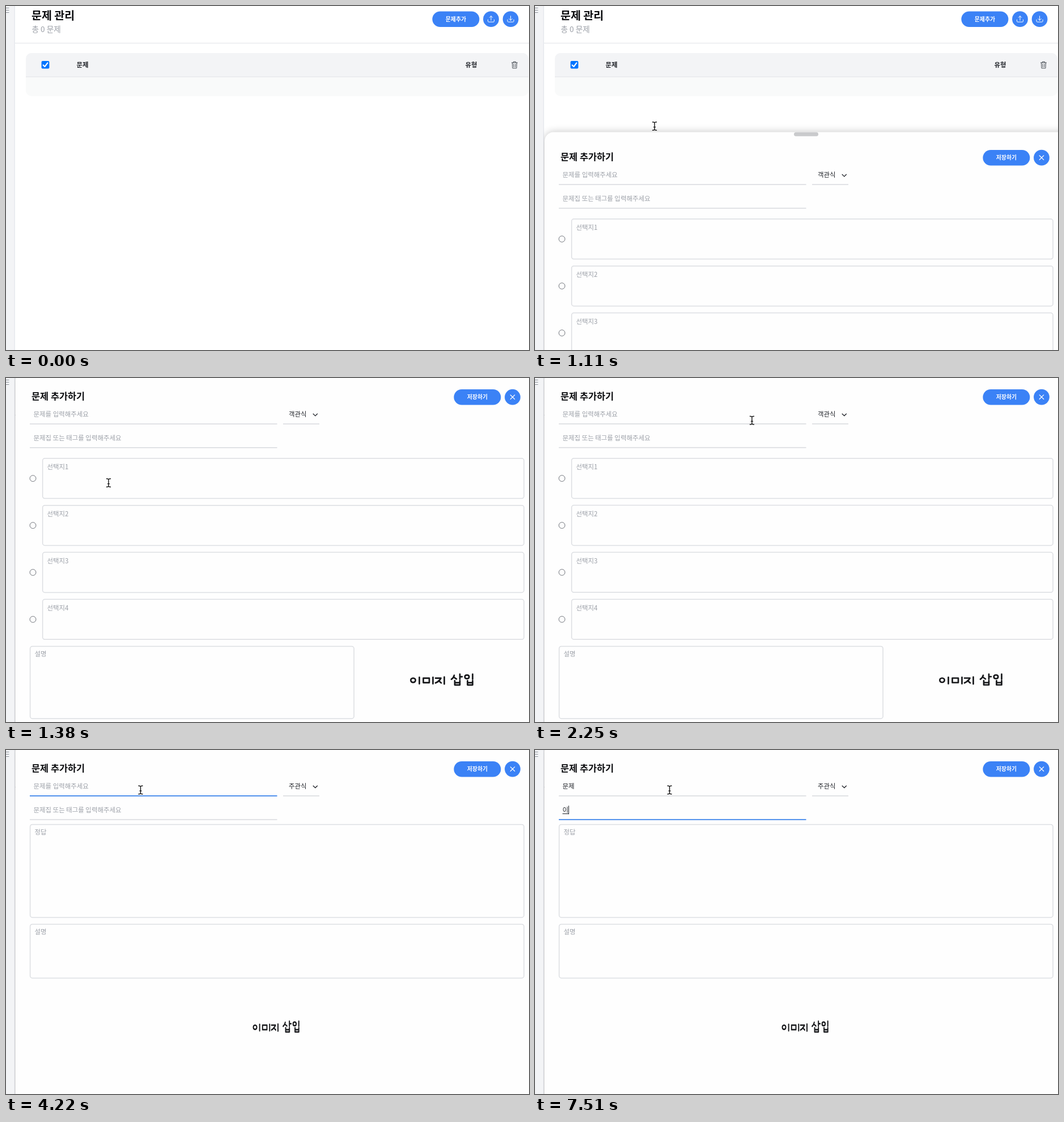
An HTML page with a canvas for the animation above (8000 ms loop, 923x607 px).

```html
<!DOCTYPE html>
<html lang="ko">
<head>
<meta charset="utf-8">
<title>문제 관리</title>
<style>
html, body { margin: 0; width: 100%; height: 100%; overflow: hidden; background: #fff; }
canvas { display: block; }
</style>
</head>
<body>
<canvas id="stage" width="923" height="607"></canvas>
<script>
const W = 923, H = 607, LOOP = 8000;
const c = document.getElementById('stage').getContext('2d');
const FONT = '"Noto Sans CJK KR", "Noto Sans CJK", "Noto Sans CJK JP", sans-serif';
const BLUE = '#3b82f6', FOCUS = '#347fea', LINE = '#dcdee2', INK = '#1f2228', HINT = '#9ca0a8';
const SIZE = 11.45;

// [time, x, y] of the pointer's hot spot
const PATH = [
  [20, 915, 595], [250, 890, 400], [450, 850, 180], [650, 805, 40], [720, 797, 17], [820, 795, 22],
  [890, 795, 22], [1000, 480, 130], [1110, 211, 212], [1250, 187, 200], [1380, 181, 185],
  [1680, 172, 112], [1720, 172, 110], [2100, 300, 80], [2500, 521, 66], [2700, 520, 72],
  [3020, 518, 103], [3150, 516, 110], [3230, 516, 110], [3360, 470, 84], [3600, 280, 74], [3820, 237.5, 70.5]
];

// [time, text, start of the syllable being composed]
const FIRST = [[4880, 'ㅁ', 0], [4960, '무', 0], [5040, '문', 0], [5260, '문ㅈ', 1], [5330, '문제', 1], [5620, '문제', 2]];
const SECOND = [[6340, 'ㅇ', 0], [6480, '이', 0]];

const within = (t, a, b) => t >= a && t < b;

function text(s, x, y, size = SIZE, color = INK, weight = 400, align = 'left') {
  c.font = `${weight} ${size}px ${FONT}`;
  c.fillStyle = color;
  c.textAlign = align;
  c.fillText(s, x, y + size * 0.38);
}

function rect(x, y, w, h, color) {
  c.fillStyle = color;
  c.fillRect(x, y, w, h);
}

function round(x, y, w, h, r, fill, stroke, lw = 1.5) {
  c.beginPath();
  c.roundRect(x, y, w, h, r);
  if (fill) { c.fillStyle = fill; c.fill(); }
  if (stroke) { c.strokeStyle = stroke; c.lineWidth = lw; c.stroke(); }
}

function draw(d, color, lw, x = 0, y = 0, sx = 1, sy = 1, fill) {
  c.save();
  c.translate(x, y);
  c.scale(sx, sy);
  c.lineCap = c.lineJoin = 'round';
  c.strokeStyle = color;
  c.lineWidth = lw;
  const p = new Path2D(d);
  if (fill) { c.fillStyle = fill; c.fill(p); }
  c.stroke(p);
  c.restore();
}

function pill(x, y, label) {
  round(x, y, 83, 27.6, 13.8, BLUE);
  text(label, x + 41.5, y + 13.7, 9.9, '#fff', 600, 'center');
}

function disc(x, y, icon, lw = 1) {
  round(x - 13.9, y - 13.9, 27.8, 27.8, 13.9, BLUE);
  draw(icon, '#fff', lw, x, y);
}

function page() {
  rect(0, 0, W, H, '#fff');
  rect(0, 0, 14.5, H, '#f3f4f6');
  rect(14.5, 0, 1.2, H, '#dfe2e7');
  draw('M-1 3.5H5M-1 7.5H5M-1 11.5H5', '#8b9098', 1.1);
  text('문제 관리', 45, 16.5, 19.5, '#0b0c0f', 600);
  text('총 0 문제', 45.5, 40.5, 13.6, HINT);
  pill(752.4, 9.4, '문제추가');
  const tray = 'M-5.5 1V3.5Q-5.5 5 -4 5H4Q5.5 5 5.5 3.5V1';
  disc(856, 23.2, tray + 'M0 2V-5.5M-2.7 -2.8L0 -5.5L2.7 -2.8');
  disc(890.6, 23.2, tray + 'M0 -5.5V2M-2.7 -0.7L0 2L2.7 -0.7');
  rect(16, 65, W, 1, '#e2e4e8');

  round(35, 83, 887, 76, 10, '#f9fafa');
  round(35, 83, 887, 42, [10, 10, 0, 0], '#f3f4f6');
  rect(35, 124.5, 887, 1, '#e1e4e8');
  round(62.6, 97, 13.8, 13.6, 2, '#0075ff');
  draw('M65.6 104.2L68.4 107L73.4 100.4', '#fff', 2.1);
  text('문제', 124.5, 104, SIZE, INK, 600);
  text('유형', 810.5, 104, SIZE, INK, 600);
  draw('M-5 -4H5M-2 -4V-5.7H2V-4M-4 -4L-3.5 5.8H3.5L4 -4M-1.6 -1.6L-1.4 3.6M1.6 -1.6L1.4 3.6', '#4b5058', 1, 897.5, 104);
}

function box(x, y, w, h, hint) {
  round(x + 0.6, y + 0.4, w - 1, h - 1, 4, null, LINE);
  text(hint, x + 8.5, y + (x > 50 ? 15.5 : 13.5), SIZE, HINT);
}

// hand-lettered picture caption
function lettering(x, y, sx, sy) {
  const b = 'v7.5h9v-7.5m-9 3.5h9';
  draw('M5.5 9.5C0 9.5 0 17 5.5 17C11 17 11 9.5 5.5 9.5M16.5 8V19.5' +
    'M23.5 9.5V17.5H34V9.5ZM40.5 8V19.5M45 9.5H54.5Q52 15 45 18M50.5 14L55 18M60.5 7.5V20' +
    'M78 4.5Q77 9 73 11.5M77.5 8L82 11M88 2.5V11.5M88 7H92M79 14' + b +
    'M100.5 4C95.5 4 95.5 10.5 100.5 10.5C105.5 10.5 105.5 4 100.5 4M110.5 2.5V11.5M101.5 14' + b, '#17181b', 2.7, x, y, sx, sy);
}

function field(y, typed, hint, t, caretOn) {
  let cur = null;
  for (const k of typed) if (t >= k[0]) cur = k;
  if (!cur) text(hint, 48.5, y, SIZE, HINT);
  let end = 48.5;
  if (cur) {
    text(cur[1], 48.5, y, SIZE, INK);
    end += c.measureText(cur[1]).width;
    if (cur[2] < cur[1].length) {
      const start = 48.5 + c.measureText(cur[1].slice(0, cur[2])).width;
      rect(start, y + 6.7, end - start, 1, INK);
    }
  }
  if (caretOn) rect(Math.round(end), y - 7, 1, 15, cur ? INK : '#5c7396');
}

function panel(t, dy) {
  c.save();
  c.beginPath();
  c.rect(15, 0, W, H);
  c.clip();
  c.translate(0, dy);
  c.save();
  c.shadowColor = 'rgba(0,0,0,.24)';
  c.shadowBlur = 14;
  round(17, -11.5, W, 760, [16, 0, 0, 0], '#fefefe');
  c.restore();
  round(457, -11.2, 43, 7, 3.5, '#c9cacc');

  text('문제 추가하기', 45, 32, 16.4, '#0b0c0f', 600);
  pill(790.4, 19.9, '저장하기');
  disc(894, 33.6, 'M-3.7 -3.7L3.7 3.7M3.7 -3.7L-3.7 3.7', 1.3);

  const short = t >= 3230;
  const on1 = within(t, 3720, 5620), on2 = t >= 6070;
  const onSelect = within(t, 2570, 3720) || within(t, 5620, 6070);
  const caret1 = within(t, 3720, 4220) || within(t, 4810, 5620);
  const caret2 = on2 && !within(t, 7000, 7510);
  const under = (x, y, w, on) => rect(x, y, w, 1.7, on ? FOCUS : LINE);
  under(42, 80.1, 436.5, on1);
  under(489, 80.1, 64, onSelect);
  under(42, 121.9, 436.5, on2);
  field(64, FIRST, '문제를 입력해주세요', t, caret1);
  field(105.3, SECOND, '문제집 또는 태그를 입력해주세요', t, caret2);
  text(short ? '주관식' : '객관식', 499, 64);
  draw('M542.2 63.2L545.8 66.8L549.4 63.2', INK, 1.3);

  if (short) {
    box(42, 131, 872.5, 165, '정답');
    box(42, 307, 872.5, 96, '설명');
    lettering(435.5, 476, 0.735, 1);
  } else {
    for (let i = 0; i < 4; i++) {
      const y = 141.3 + i * 82.9;
      box(64, y, 850.5, 71.8, '선택지' + (i + 1));
      c.beginPath();
      c.arc(47.5, y + 35.8, 5.4, 0, 7);
      c.strokeStyle = '#70747b';
      c.lineWidth = 1;
      c.stroke();
    }
    box(42, 473, 572.5, 128.5, '설명');
    lettering(713, 520, 1, 1);
  }
  c.restore();
}

function menu() {
  c.save();
  c.shadowColor = 'rgba(0,0,0,.32)';
  c.shadowBlur = 42;
  c.shadowOffsetY = 14;
  round(489.5, 82.5, 62.5, 43, 5, '#fff');
  c.restore();
  round(489.5, 82.5, 62.5, 43, 5, '#fff', '#a3a5a9', 1);
  round(490, 83, 61.5, 21, [4, 4, 0, 0], '#1a67d5');
  text('객관식', 499.5, 93.3, SIZE, '#fff');
  text('주관식', 499.5, 114.8, SIZE, INK);
}

function pointer(t) {
  if (t < 20) return;
  let i = 0;
  while (i < PATH.length - 2 && t >= PATH[i + 1][0]) i++;
  const [t0, x0, y0] = PATH[i], [t1, x1, y1] = PATH[i + 1];
  const k = Math.min(1, (t - t0) / (t1 - t0));
  const x = x0 + (x1 - x0) * k, y = y0 + (y1 - y0) * k;
  if (within(t, 700, 950)) {
    draw('M-1.5 0Q0 -2 1.5 0V5Q3 4 4 5.5Q6 5 6.5 6.5Q8.5 6 8.5 8V11Q8 14 6.5 16H-1.5Q-3 13 -5.5 10Q-5.5 8 -3.5 8.6L-1.5 10Z',
      '#111', 1, x, y, 1, 1, '#fff');
  } else if (within(t, 950, 2350) || t >= 3330) {
    draw('M-3.5 -7.2Q-0.6 -7.4 0 -6Q0.6 -7.4 3.5 -7.2M0 -6V6M-3.5 7.2Q-0.6 7.4 0 6Q0.6 7.4 3.5 7.2M-1.5 1.6H1.5', '#111', 1.4, x, y);
  } else {
    draw('M0 0V14.5L3.4 11.4L5.8 17L8.2 16L5.8 10.5H10.5Z', '#4a4c50', 0.9, x, y, 1, 1, 'rgba(255,255,255,.8)');
  }
}

// y of the curve cubic-bezier(.4, 0, .2, 1)
function ease(p) {
  if (p <= 0) return 0;
  if (p >= 1) return 1;
  let lo = 0, hi = 1, s = 0.5;
  for (let i = 0; i < 24; i++) {
    s = (lo + hi) / 2;
    const q = 1 - s;
    if (1.2 * q * q * s + 0.6 * q * s * s + s * s * s < p) lo = s; else hi = s;
  }
  return 3 * (1 - s) * s * s + s * s * s;
}

function frame(now) {
  const t = now % LOOP;
  page();
  if (t >= 890) panel(t, 630 * (1 - ease((t - 918.5) / 470)));
  if (within(t, 2570, 3230)) menu();
  pointer(t);
}

let begin;
function tick(now) {
  if (begin === undefined) begin = now;
  frame(now - begin);
  requestAnimationFrame(tick);
}
frame(0);
requestAnimationFrame(tick);
</script>
</body>
</html>
```
